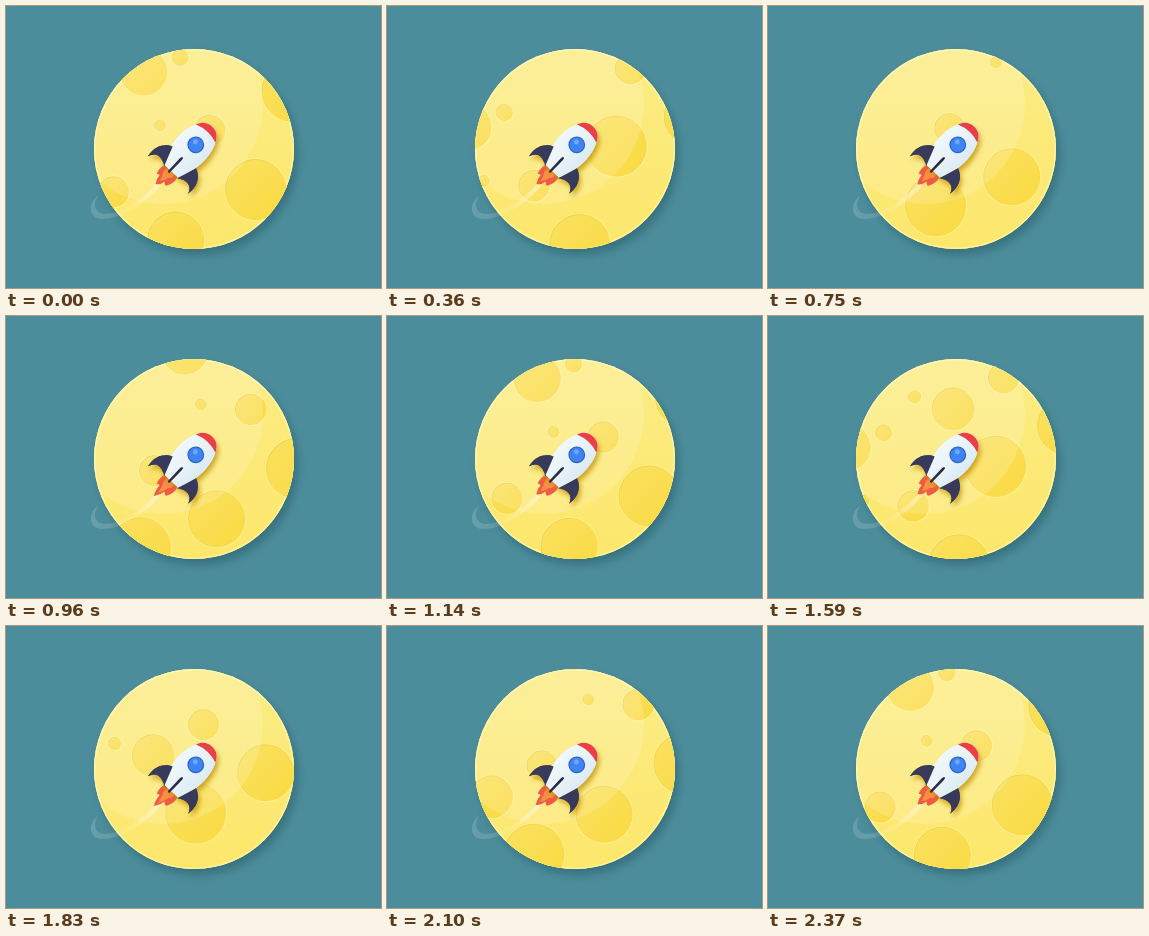
Animation of 375x282 px, one loop 2400 ms. Source, as an HTML page with a canvas:

```html
<!DOCTYPE html>
<html lang="en">
<head>
<meta charset="utf-8">
<title>Rocket over the moon</title>
<style>
  html, body { margin: 0; width: 100%; height: 100%; overflow: hidden; background: #4c8d9b; }
  canvas { display: block; }
</style>
</head>
<body>
<canvas id="stage" width="375" height="282"></canvas>
<script>
const ctx = document.getElementById('stage').getContext('2d');
const LOOP = 2400, FLICKER = 400;
const VX = -0.158, VY = 0.153; // crater drift, px per ms
const MOON = [188, 143, 100];

// x, y, radius
const craters = [
  [138, 66, 23.5], [174.5, 51.5, 8.5], [154.3, 119.5, 5.8], [204, 124.5, 15.7],
  [250, 183.5, 30.5], [170, 234, 28.5], [286.5, 85, 30.5], [107.8, 185.7, 15.5]
];
const extraCraters = [[244, 27.4, 21.3], [205.5, 15.5, 6.5]];

function gradient(x0, y0, x1, y1, ...colors) {
  const g = ctx.createLinearGradient(x0, y0, x1, y1);
  colors.forEach((c, i) => g.addColorStop(i / (colors.length - 1), c));
  return g;
}

function disc(x, y, r, fill) {
  ctx.beginPath();
  ctx.arc(x, y, r, 0, Math.PI * 2);
  ctx.fillStyle = fill;
  ctx.fill();
}

function shape(d, fill) {
  ctx.fillStyle = fill;
  ctx.fill(new Path2D(d));
}

function shadow(color, blur, x, y) {
  ctx.shadowColor = color;
  ctx.shadowBlur = blur;
  ctx.shadowOffsetX = x;
  ctx.shadowOffsetY = y;
}

function drawCrater(x, y, r) {
  const d = r * 0.7;
  disc(x, y, r + 0.8, 'rgba(255,244,160,.8)');
  disc(x, y, r - 0.2, gradient(x - d, y - d, x + d, y + d, '#fae05c', '#fadb46'));
  ctx.lineWidth = 1;
  ctx.strokeStyle = gradient(x - d, y - d, x + d, y + d,
    'rgba(232,200,50,.75)', 'rgba(236,206,60,.35)', 'rgba(236,206,60,.1)');
  ctx.stroke();
}

function drawField(list, age, dx, dy) {
  for (const [x, y, r] of list) drawCrater(x + dx + VX * age, y + dy + VY * age, r);
}

function drawMoon(t) {
  ctx.save();
  shadow('rgba(28,78,92,.45)', 10, 4, 6);
  disc(...MOON, '#fde97a');
  ctx.restore();

  ctx.save();
  disc(...MOON, gradient(0, 43, 0, 243, '#fbec84', '#fde76c'));
  ctx.clip();
  ctx.lineWidth = 2.5;
  ctx.strokeStyle = 'rgba(255,250,190,.65)';
  ctx.stroke();
  const age = (t + LOOP / 2) % LOOP - LOOP / 2;
  drawField(craters, age, 0, 0);
  drawField(craters.concat(extraCraters), t - 1140, 12.5, -3.5);
  disc(157, 98, 100, gradient(150, 0, 165, 198, 'rgba(255,255,255,.18)', 'rgba(255,255,255,.15)'));
  ctx.restore();
}

function drawTrail() {
  shape('M92 190C82 196 82 213 96 213C114 213 137 200 154 180L151 177C133 197 113 208 99 208C88 207 87 198 92 190Z',
    gradient(86, 205, 153, 178, 'rgba(255,255,255,.15)', 'rgba(255,255,255,.1)', 'rgba(255,255,255,.45)'));
}

function drawFins() {
  for (const side of [1, -1]) {
    ctx.save();
    ctx.scale(side, 1);
    shape('M16 17C23 20 30 27 27.5 41Q25 34 20 33.5Q15 33 9 37Z', '#383a5c');
    ctx.restore();
  }
}

function drawFlame(t) {
  const tip = 57.5 - 1.5 * Math.cos(t / FLICKER * Math.PI * 2);
  shape(`M-9 35Q-12 42 -9 48Q-7 46 -6 47Q-6 52 -3 ${tip}Q1 54 2 48Q4 51 6 50Q11 43 8 35Z`, '#ef5a45');
  shape(`M-5 36Q-7 41 -4 45L-2 ${tip - 5}Q2 47 2 43Q6 41 4 36Z`, '#f98f42');
}

function drawRocket(t) {
  const body = 'M-1 -24.5C6 -24.5 10 -21 12.5 -15C18 -4 18 12 14 22Q12 30 9 36L-11 36Q-14 30 -16 22C-20 12 -20 -4 -14 -15C-12 -21 -7 -24.5 -1 -24.5Z';
  ctx.save();
  ctx.translate(190, 139);
  ctx.rotate(43 * Math.PI / 180);
  drawFlame(t);

  ctx.save();
  shadow('rgba(190,140,0,.75)', 5, 2, 4);
  drawFins();
  shape(body, '#e8f3f8');
  ctx.restore();

  shape(body, gradient(-18, 0, 16, 0, '#f1f8fb', '#e8f3f8', '#dcebf4'));
  drawFins();
  shape('M-1 -24.5C6 -24.5 10 -21 12.5 -15Q-1 -20 -14 -15C-12 -21 -7 -24.5 -1 -24.5Z', '#ea3f45');

  disc(-0.3, 0, 8.4, '#2e62c6');
  disc(-0.3, 0, 7.2, '#3f84f3');
  disc(-2.6, -1.8, 2.5, '#6fa8fa');

  shape('M-1.4 18Q0 18 0 21L-0.4 38Q-1.5 40 -2.8 38L-2.8 21Q-2.8 18 -1.4 18Z', '#292b45');
  ctx.restore();
}

function draw(t) {
  ctx.fillStyle = '#4c8d9b';
  ctx.fillRect(0, 0, 375, 282);
  drawMoon(t);
  drawTrail();
  drawRocket(t);
}

const start = performance.now();
function tick() {
  draw((performance.now() - start) % LOOP);
  requestAnimationFrame(tick);
}
tick();
</script>
</body>
</html>
```
